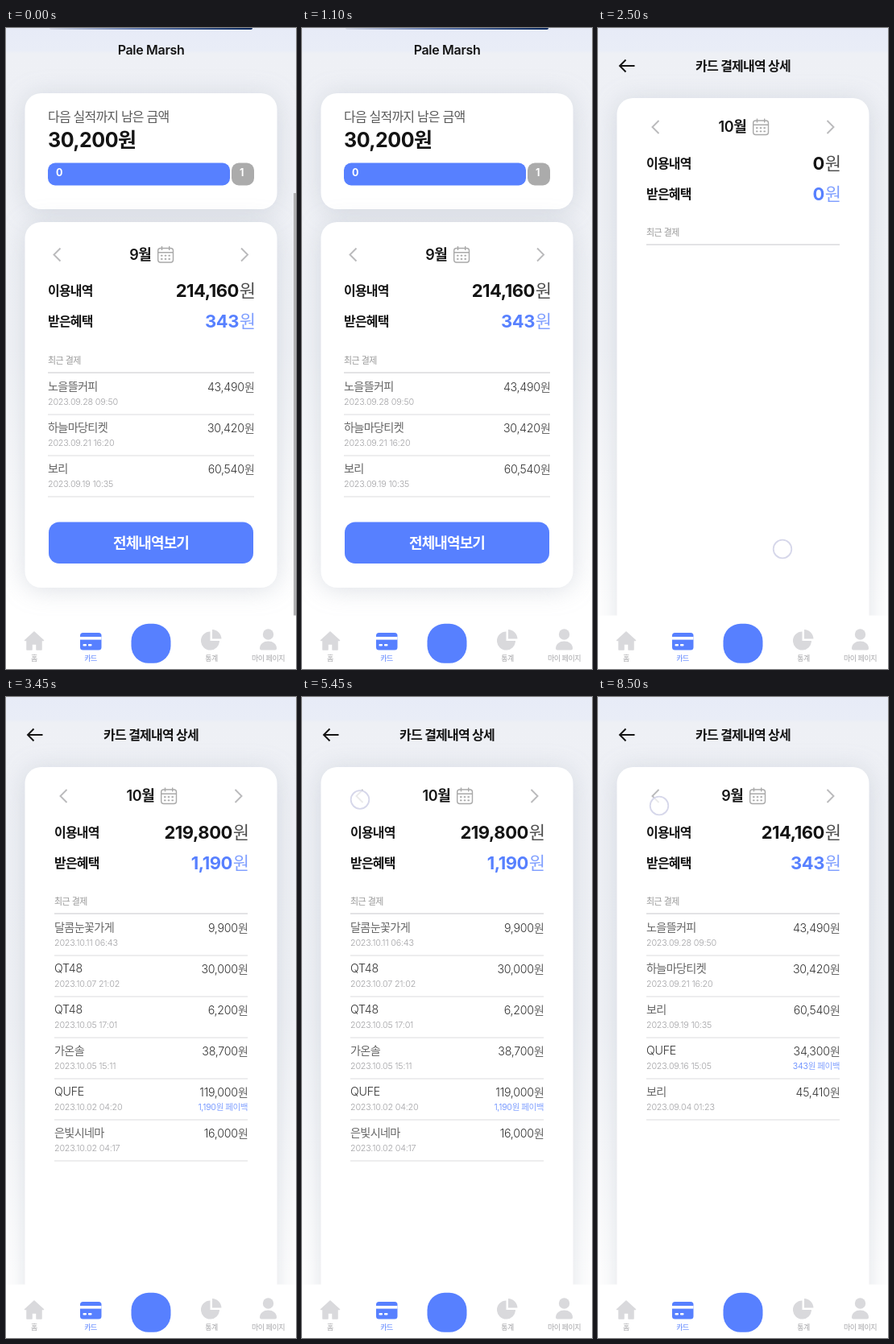
An HTML page for the animation above (8550 ms loop, 360 px wide and 796 px high).

```html
<!DOCTYPE html>
<html lang="ko">
<head>
<meta charset="utf-8">
<style>
  html, body { margin: 0; width: 100%; height: 100%; overflow: hidden; background: #fff; }
  svg { display: block; width: 360px; height: 796px; }
  text { font-family: Inter, "Noto Sans CJK KR", "Noto Sans CJK", sans-serif; letter-spacing: -.02em; white-space: pre; }
  .ko { letter-spacing: -.05em; }
  [font-weight="300"] .ko { fill-opacity: .75; }
  .panel { fill: #fff; filter: drop-shadow(0 3px 15px #8d96aa47); }
</style>
</head>
<body>
<svg id="stage" viewBox="0 0 360 796"></svg>
<script>
const LOOP = 8550;
const BLUE = '#5780ff', INK = '#141414', GREY = '#a9a9a9', ICON = '#d9d9dc';

const rect = (x, y, w, h, r, fill, extra = '') =>
  `<rect x="${x}" y="${y}" width="${w}" height="${h}" rx="${r}" fill="${fill}" ${extra}/>`;
const line = (d, color, width) =>
  `<path d="${d}" fill="none" stroke="${color}" stroke-width="${width}"/>`;
const hangul = s => String(s).replace(/[가-힣][가-힣 ]*/g, run => `<tspan class="ko">${run}</tspan>`);
const text = (s, x, y, size, weight = 400, color = INK, anchor = 'start') =>
  `<text x="${x}" y="${y}" font-size="${size}" font-weight="${weight}" fill="${color}" text-anchor="${anchor}">${hangul(s)}</text>`;
const group = (id, body) => `<g id="${id}">${body}</g>`;
const panel = (y, h) => rect(23.5, y, 313, h, 20, '#fff', 'class="panel"');

const chevron = (x, y, dir) =>
  line(`M${x + 4 * dir} ${y - 8}L${x - 4 * dir} ${y}l${8 * dir} 8`, '#bababc', 1.9);

function calendar(x, y) {
  const dots = [0, 1, 2, 3, 4, 5].map(i =>
    rect(x + 4 + i % 3 * 4.7, y + 10.8 + (i / 3 | 0) * 4.2, 2.6, 1.7, .4, GREY)).join('');
  return rect(x + .7, y + 2.5, 18.8, 17.5, 3, 'none', `stroke="${GREY}" stroke-width="1.4"`) +
    line(`M${x + 1} ${y + 7.8}h18M${x + 5.5} ${y}v5M${x + 14.7} ${y}v5`, GREY, 1.4) + dots;
}

function month(n, y) {
  const end = n > 9 ? 184 : 180;
  return text(n + '월', end, y + 6.2, 18, 600, INK, 'end') + calendar(end + 8, y - 10.5);
}

// Label on the left, large number with a light currency sign on the right.
const total = (label, n, x, y, color) =>
  text(label, x, y - 1.7, 16, 600) +
  text(n, 341 - x, y, 22, 700, color, 'end') + text('원', 361 - x, y, 22, 300, color, 'end');

const totals = (spent, gained, x, y) =>
  total('이용내역', spent, x, y, INK) + total('받은혜택', gained, x, y + 38, BLUE);

const recentHeader = (x, y) =>
  text('최근 결제', x, y - 11.5, 11, 300, '#777') + line(`M${x} ${y}H${360 - x}`, '#dadadc', 1.7);

const payments = (rows, x, y) => rows.map(([name, date, price, back], i) => {
  const top = y + i * 51, end = 360 - x;
  return text(name, x, top + 22, 14.2, 300, '#333') +
    text(date, x, top + 40.3, 10.8, 300, '#a2a2a5') +
    text(price + '원', end, top + 22.5, 14.2, 300, '#333', 'end') +
    (back ? text(back + '원 페이백', end, top + 40.3, 10.6, 300, BLUE, 'end') : '') +
    line(`M${x} ${top + 52}h${end - x}`, '#dcdcde', 1);
}).join('');

const september = [
  ['노을뜰커피', '2023.09.28 09:50', '43,490'],
  ['하늘마당티켓', '2023.09.21 16:20', '30,420'],
  ['보리', '2023.09.19 10:35', '60,540'],
  ['QUFE', '2023.09.16 15:05', '34,300', '343'],
  ['보리', '2023.09.04 01:23', '45,410'],
];
const october = [
  ['달콤눈꽃가게', '2023.10.11 06:43', '9,900'],
  ['QT48', '2023.10.07 21:02', '30,000'],
  ['QT48', '2023.10.05 17:01', '6,200'],
  ['가온솔', '2023.10.05 15:11', '38,700'],
  ['QUFE', '2023.10.02 04:20', '119,000', '1,190'],
  ['은빛시네마', '2023.10.02 04:17', '16,000'],
];

const home = rect(0, 0, 360, 796, 0, 'url(#sky)') +
  rect(54, -20, 252, 22, 2, 'url(#cardEdge)') +
  text('Pale Marsh', 180, 33, 16, 600, INK, 'middle') +
  panel(81, 144) +
  text('다음 실적까지 남은 금액', 52, 116, 16, 300, '#222') +
  text('30,200원', 52, 148, 25, 700) +
  rect(52, 167.5, 226, 28, 9, BLUE) + rect(280, 167.5, 28, 28, 9, '#ababab') +
  text('0', 62, 184, 12.5, 700, '#fff') + text('1', 290, 184, 12.5, 700, '#fff') +
  panel(241, 454) + chevron(63.5, 281.5, 1) + chevron(296, 281.5, -1) + month(9, 281.5) +
  totals('214,160', '343', 52, 334) + recentHeader(52, 428) + payments(september.slice(0, 3), 52, 428) +
  rect(53, 613.5, 254, 51.5, 13, BLUE) + text('전체내역보기', 180, 645.5, 18, 700, '#fff', 'middle') +
  rect(357, 205, 3, 591, 0, '#b0b0b2', 'id="scrollbar"');

const detail = rect(0, 0, 360, 796, 0, 'url(#sky)') +
  line('M45.5 47H27M34.5 39.5L27 47l7.5 7.5', INK, 1.9) +
  text('카드 결제내역 상세', 180, 52.5, 16, 600, INK, 'middle') +
  panel(87, 720) + chevron(71.5, 123, 1) + chevron(288.5, 123, -1) + recentHeader(60, 269) +
  group('empty', month(10, 123) + totals('0', '0', 60, 176)) +
  group('october', month(10, 123) + totals('219,800', '1,190', 60, 176) + payments(october, 60, 269)) +
  group('september', month(9, 123) + totals('214,160', '343', 60, 176) + payments(september, 60, 269));

const tab = (label, x, color) => text(label, x, 786, 9, 400, color, 'middle');
const nav = rect(0, 729.5, 360, 67, 0, '#fff') +
  `<path d="M35 750l11.5 10.5h-2.5v11.5h-6v-7h-6v7h-6v-11.5h-2.5z" fill="${ICON}" stroke="${ICON}" stroke-width="1.5" stroke-linejoin="round"/>` +
  rect(92, 751, 26.5, 21.5, 3.5, BLUE) + rect(92, 756, 26.5, 3.6, 0, '#fff') +
  rect(95.5, 765, 4.5, 2.5, 1, '#fff') + rect(102, 765, 4.5, 2.5, 1, '#fff') +
  rect(155.5, 739.8, 49, 49, 21.5, BLUE) +
  `<path d="M253.5 749.5v11.5h11.5a11.5 11.5 0 1 1-11.5-11.5zM256 747a12 12 0 0 1 11.5 11.5H256z" fill="${ICON}"/>` +
  `<circle cx="325.5" cy="753" r="6.7" fill="${ICON}"/>` +
  `<path d="M315 770.5c0-12 21-12 21 0q0 2-2 2h-17q-2 0-2-2z" fill="${ICON}"/>` +
  tab('홈', 35, '#a5a5a8') + tab('카드', 105, BLUE) + tab('통계', 255, '#a5a5a8') + tab('마이 페이지', 325.5, '#a5a5a8');

const stage = document.getElementById('stage');
stage.innerHTML = `<defs>
  <linearGradient id="sky" x2="0" y2="1">
    <stop stop-color="#e7ebf7"/><stop offset=".035" stop-color="#e9edf7"/><stop offset=".04" stop-color="#eef0f5"/>
    <stop offset=".5" stop-color="#f0f2f6"/><stop offset=".9" stop-color="#fff"/>
  </linearGradient>
  <linearGradient id="cardEdge">
    <stop stop-color="#d5d9e8"/><stop offset=".45" stop-color="#5f78ae"/><stop offset="1" stop-color="#0b2a5e"/>
  </linearGradient></defs>` +
  group('home', home) + group('detail', detail) + nav +
  `<circle id="touch" r="11.3" fill="#fff" fill-opacity=".7" stroke="#d6d7ea" stroke-width="1.8"/>`;

const part = id => document.getElementById(id);
const show = (id, visible) => part(id).setAttribute('display', visible ? 'inline' : 'none');
const fade = (id, amount) => part(id).setAttribute('opacity', amount);
const ramp = (t, from, to) => Math.min(1, Math.max(0, (t - from) / (to - from)));

// Each tap: position, press time, start and end of its fade.
const taps = [
  [229, 647, 2200, 2550, 2750],
  [72, 127.5, 5450, 5900, 6100],
  [76, 135, 8300, LOOP, LOOP + 200],
];

function render(t) {
  fade('scrollbar', 1 - ramp(t, 650, 900));
  fade('detail', ramp(t, 2250, 2450));
  show('detail', t >= 2250);
  show('empty', t < 3050);
  show('october', t >= 3050 && t < 5950);
  show('september', t >= 5950);

  const tap = taps.find(([, , start, , end]) => t >= start && t < end);
  show('touch', tap);
  if (tap) {
    const [x, y, , release, end] = tap;
    part('touch').setAttribute('transform', `translate(${x} ${y})`);
    fade('touch', 1 - ramp(t, release, end));
  }
}

function tick() {
  render(performance.now() % LOOP);
  requestAnimationFrame(tick);
}
tick();
</script>
</body>
</html>
```
